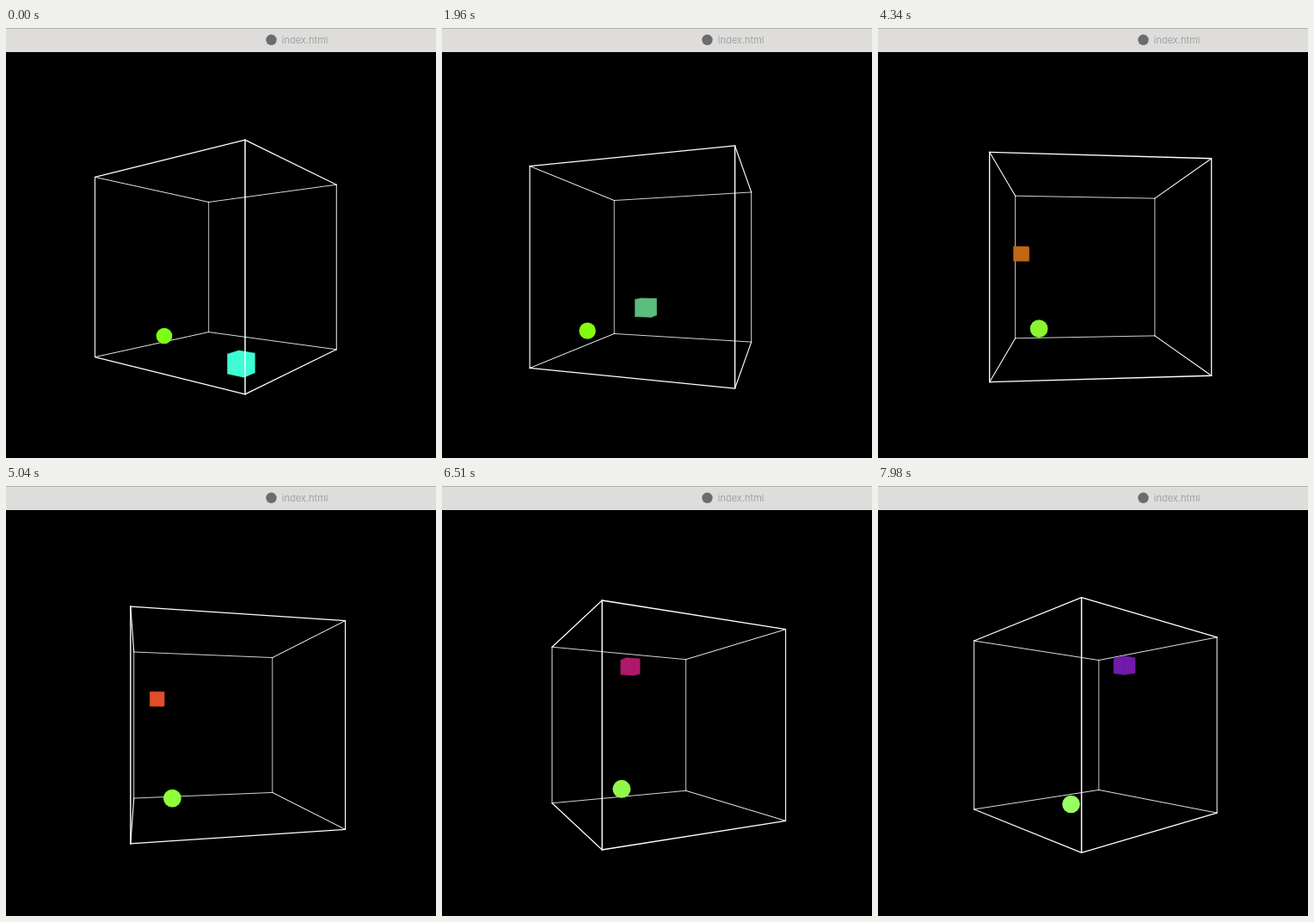
An HTML page for the animation above (8 s loop, 500 by 500 pixels).

```html
<!DOCTYPE html>
<html lang="en">
<head>
<meta charset="utf-8">
<title>Bouncing shapes</title>
<style>
  html, body { margin: 0; width: 100%; height: 100%; overflow: hidden; background: #000; }
  svg { display: block; width: 100%; height: 100%; }
  text { font: 11px Inter, "Open Sans", sans-serif; }
</style>
</head>
<body>
<svg viewBox="0 0 500 500">
  <rect width="500" height="500"/>
  <g id="back" stroke="#fff" stroke-linecap="round"></g>
  <g id="solids"><path id="cube" stroke-width=".4"/><circle id="ball"/></g>
  <g id="front" stroke="#fff" stroke-linecap="round"></g>
  <rect width="500" height="28" fill="#dedddc"/>
  <rect width="500" height="1" fill="#b4b3b2"/>
  <circle cx="308.5" cy="13.8" r="6.2" fill="#6c6c6c"/>
  <text x="320.8" y="18" fill="#a3a3a2">index.html</text>
</svg>
<script>
const LOOP = 8000, STEP = 70;
const FOCAL = 433, CX = 250, CY = 278;
const ROOM = 100, CUBE = 9, BALL = 10.2, FLOOR = 91;
const $ = id => document.getElementById(id);

// Motion inside the room: [seconds, position]
const cubePath = {
  x: [[0, 69.5], [4.44, -91], [8, 36.4]],
  y: [[0, 88.7], [.09, 91], [7.22, -90.2], [8, -70.4]],
  z: [[0, 60.5], [.62, 85.5], [5.2, -90], [8, 17]]
};
const ballPath = {
  x: [[0, -81.5], [1.3, -91], [1.96, -87.2], [3.36, -68.5], [4.34, -62.3], [5.81, -49.2], [6.51, -41], [8, -22.7]],
  z: [[0, 12], [8, -12]]
};
// Ball hops: [start, end, height]
const hops = [[-.3, 1.38, 6.2], [1.38, 5.35, 26.6], [5.58, 7.99, 19.7]];

function along(keys, t) {
  let i = 1;
  while (i < keys.length - 1 && t > keys[i][0]) i++;
  const [t0, a] = keys[i - 1], [t1, b] = keys[i];
  return a + (b - a) * (t - t0) / (t1 - t0);
}

function hopHeight(t) {
  const hop = hops.find(([a, b]) => t >= a && t < b);
  if (!hop) return 0;
  const u = (t - hop[0]) / (hop[1] - hop[0]);
  return hop[2] * 4 * u * (1 - u);
}

function project([x, y, z], angle) {
  const c = Math.cos(angle), s = Math.sin(angle);
  const depth = x * s + z * c, k = FOCAL / (FOCAL - depth);
  return { x: CX + (x * c - z * s) * k, y: CY + y * k, z: depth, k };
}

// Corner i has one sign bit per axis
const corners = (half, at = [0, 0, 0]) => Array.from({ length: 8 }, (_, i) =>
  at.map((v, axis) => v + (i >> axis & 1 ? half : -half)));

const edges = [], faces = [];
for (let axis = 0; axis < 3; axis++) {
  const a = 1 << axis, b = 1 << (axis + 1) % 3, c = 1 << (axis + 2) % 3;
  for (const i of [0, b, c, b | c]) edges.push([i, i | a]);
  for (const i of [0, a]) faces.push([i, i | b, i | b | c, i | c]);
}
const lines = edges.map(() => document.createElementNS("http://www.w3.org/2000/svg", "line"));

function set(el, attrs) {
  for (const name in attrs) el.setAttribute(name, attrs[name]);
}

function facePath(points) {
  const area = points.reduce((sum, p, i) => {
    const q = points[(i + 1) % points.length];
    return sum + p.x * q.y - q.x * p.y;
  }, 0);
  const ring = area < 0 ? [...points].reverse() : points;
  return "M" + ring.map(p => p.x.toFixed(2) + " " + p.y.toFixed(2)).join("L") + "Z";
}

function rgb(...parts) {
  return "rgb(" + parts.map(v => Math.round(Math.min(255, Math.max(0, v)))).join(",") + ")";
}

function draw(t) {
  const angle = (37.3 - 9.856 * t) * Math.PI / 180;

  const room = corners(ROOM).map(p => project(p, angle));
  edges.forEach(([i, j], n) => {
    const a = room[i], b = room[j], line = lines[n];
    set(line, { x1: a.x, y1: a.y, x2: b.x, y2: b.y, "stroke-width": (a.k + b.k) / 2 });
    const layer = a.z + b.z < 0 ? $("back") : $("front");
    if (line.parentNode !== layer) layer.append(line);
  });

  const [x, y, z] = ["x", "y", "z"].map(axis => along(cubePath[axis], t));
  const box = corners(CUBE, [x, y, z]).map(p => project(p, angle));
  const fill = rgb(130 - 1.13 * z, 127.5 + 1.417 * y, 127 + 1.23 * x);
  set($("cube"), { d: faces.map(f => facePath(f.map(i => box[i]))).join(""), fill, stroke: fill });

  const bx = along(ballPath.x, t), by = FLOOR - hopHeight(t), bz = along(ballPath.z, t);
  const p = project([bx, by, bz], angle);
  set($("ball"), {
    cx: p.x, cy: p.y, r: BALL * p.k,
    fill: rgb(138 - 1.13 * bz, 150 + 1.33 * by, 127 + 1.275 * bx)
  });

  const nearest = project([x, y, z], angle).z > p.z ? $("cube") : $("ball");
  if ($("solids").lastElementChild !== nearest) $("solids").append(nearest);
}

function tick(now) {
  draw(Math.floor(now % LOOP / STEP) * STEP / 1000);
  requestAnimationFrame(tick);
}
draw(0);
requestAnimationFrame(tick);
</script>
</body>
</html>
```
